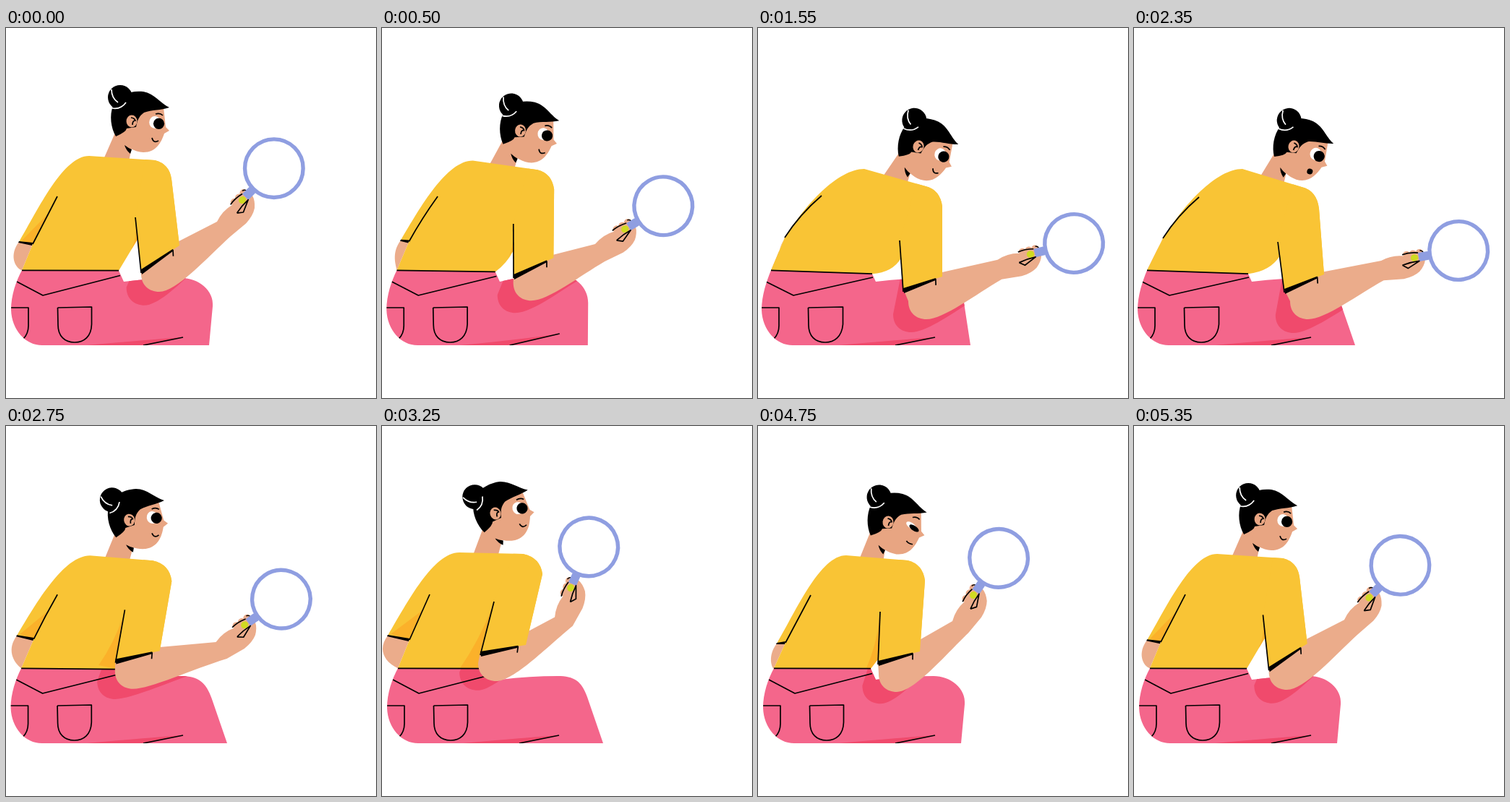
An HTML page with a canvas for the animation above (5.4 s loop, 512x512 px).

```html
<!DOCTYPE html>
<html lang="en">
<head>
<meta charset="utf-8">
<title>Woman with a magnifying glass</title>
<style>
html, body { margin: 0; width: 100%; height: 100%; overflow: hidden; background: #fff; }
canvas { display: block; width: 100vw; height: 100vh; object-fit: contain; }
</style>
</head>
<body>
<canvas id="stage" width="512" height="512"></canvas>
<script>
const ctx = document.getElementById('stage').getContext('2d');
const LOOP = 5400, STEP = 50;
const C = {
  shirt: '#f9c435', fold: '#fbb12a', pants: '#f4668b', shade: '#f04a6c',
  face: '#e8a582', arm: '#ebac8b', lens: '#8f9ee1', nail: '#d0da22', ink: '#000', white: '#fff'
};

// top/right/side: shoulders; cuff, inner: sleeve hem; pit: armpit; back: far sleeve; head, hand: x, y, degrees
const upright = {
  top: [115, 177], right: [206, 183], side: [229, 209], cuff: [240, 301], inner: [187, 335],
  pit: [179, 262], hem: [.41], elbow: [212, 340], fold: [173, 307],
  backTop: [71, 233], backEnd: [37, 299], backCuff: [18, 296],
  head: [174, 129, 0], hand: [327, 238, -45], knee: [281, 286, 385, 346], lean: [0]
};
const stoop = {
  top: [143, 194], right: [230, 218], side: [253, 247], cuff: [233, 346], inner: [174, 353],
  pit: [186, 285], hem: [.7], elbow: [198, 372], fold: [178, 333],
  backTop: [87, 233], backEnd: [38, 290], backCuff: [39, 290],
  head: [220, 163, 15], hand: [345, 320, -17], knee: [291, 284, 373, 333], lean: [1]
};
const reach = {
  ...stoop, top: [147, 195], right: [232, 219], side: [255, 247], cuff: [255, 344], inner: [201, 361],
  pit: [196, 294], hem: [.37], elbow: [233, 378], fold: [198, 319],
  backTop: [88, 232], backEnd: [37, 290], backCuff: [38, 290],
  head: [222, 164, 17], hand: [377, 313, -14], knee: [294, 285, 380, 346]
};
const look = {
  ...reach, top: [150, 195], right: [232, 220], side: [256, 250], cuff: [263, 341], inner: [208, 362],
  pit: [199, 296], hem: [.3], elbow: [241, 378], fold: [202, 316],
  backTop: [90, 234], backEnd: [40, 291], backCuff: [41, 291],
  head: [221, 164, 16], hand: [388, 318, -9.3], knee: [306, 287, 384, 346]
};
const raise = {
  top: [107, 175], right: [195, 177], side: [222, 205], cuff: [199, 303], inner: [136, 313],
  pit: [155, 243], hem: [1], elbow: [158, 328], fold: [108, 335],
  backTop: [66, 233], backEnd: [38, 296], backCuff: [8, 290],
  head: [157, 121, -16], hand: [261, 224, -66], knee: [306, 284, 375, 346], lean: [0]
};
const study = {
  ...upright, top: [122, 179], right: [207, 186], side: [231, 214], cuff: [224, 312], inner: [166, 326],
  pit: [169, 257], hem: [.95], elbow: [192, 343], fold: [150, 335],
  backTop: [73, 234], backEnd: [38, 300], backCuff: [26, 301],
  head: [180, 133, 6], hand: [298, 234, -55.5]
};

const lerp = (a, b, k) => a + (b - a) * k;
const mid = (p, q, k) => [lerp(p[0], q[0], k), lerp(p[1], q[1], k)];
const add = (p, x, y) => [p[0] + x, p[1] + y];

function mix(a, b, k, handK = k) {
  const out = {};
  for (const f in a) out[f] = a[f].map((v, i) => lerp(v, b[f][i], f === 'hand' ? handK : k));
  return out;
}

const keys = [
  [0, upright],
  [600, mix(upright, stoop, .5, .62)],
  [850, stoop],
  [1100, mix(stoop, reach, .12)],
  [1550, reach],
  [1950, { ...mix(reach, look, 1.4, 3), head: [227, 171, 19] }],
  [2350, look],
  [2800, mix(look, raise, .87, .52)],
  [3000, mix(look, raise, 1.09, .8)],
  [3250, raise],
  [3850, mix(upright, study, .35, 0)],
  [4200, mix(upright, study, .4, .02)],
  [4750, study]
];

function keyAt(i) {
  const n = keys.length, turn = Math.floor(i / n), k = keys[i - turn * n];
  return [k[0] + turn * LOOP, k[1]];
}

// Monotone cubic through the poses
function poseAt(t) {
  let i = keys.length - 1;
  while (keys[i][0] > t) i--;
  const k = [keyAt(i - 1), keyAt(i), keyAt(i + 1), keyAt(i + 2)];
  const h = k[2][0] - k[1][0], s = (t - k[1][0]) / h;
  const slope = (a, b) => a * b <= 0 ? 0 : 2 * a * b / (a + b);
  const pose = {};
  for (const f in upright) {
    pose[f] = upright[f].map((_, j) => {
      const v = k.map(e => e[1][f][j]);
      const d = [0, 1, 2].map(n => (v[n + 1] - v[n]) / (k[n + 1][0] - k[n][0]));
      const m0 = slope(d[0], d[1]) * h, m1 = slope(d[1], d[2]) * h;
      const s2 = s * s, s3 = s2 * s;
      return v[1] * (2 * s3 - 3 * s2 + 1) + m0 * (s3 - 2 * s2 + s) + v[2] * (3 * s2 - 2 * s3) + m1 * (s3 - s2);
    });
  }
  return pose;
}

// Each step holds one, two or three points: line, quadratic or cubic
function trace(start, ...steps) {
  const p = new Path2D();
  p.moveTo(...start);
  for (const s of steps) {
    if (s.length === 2) p.lineTo(...s);
    else if (s.length === 4) p.quadraticCurveTo(...s);
    else p.bezierCurveTo(...s);
  }
  return p;
}
function fill(path, color) { ctx.fillStyle = color; ctx.fill(path); }
function line(path, width = 1.7, color = C.ink) {
  ctx.strokeStyle = color; ctx.lineWidth = width; ctx.stroke(path);
}
function oval(x, y, rx, ry, color) {
  const p = new Path2D();
  p.ellipse(x, y, rx, ry, 0, 0, 7);
  fill(p, color);
}
function placed([x, y, deg], draw) {
  ctx.save();
  ctx.translate(x, y);
  ctx.rotate(deg * Math.PI / 180);
  draw();
  ctx.restore();
}
function toStage([x, y, deg], u, v) {
  const a = deg * Math.PI / 180, c = Math.cos(a), s = Math.sin(a);
  return [x + u * c - v * s, y + u * s + v * c];
}

function drawNeck(p) {
  const l = p.lean[0], at = (u, v) => toStage(p.head, u, v);
  const c = mid(p.top, p.right, .6 + .09 * l), d = mid(p.top, p.right, .24 + .07 * l);
  fill(trace(at(-23, 16), at(-10, 0), at(8, 0), at(8, 25), at(0, 36), add(c, 0, 6), add(d, -4, 8)), C.face);
}

function drawBun(tilt) {
  const back = Math.min(0, tilt);
  placed([0, 0, back * .6], () => placed([-16, -33, back * 1.2], () => {
    oval(0, 0, 17, 17, C.ink);
    line(trace([-12, -11], [-12, 1, -3, 7]), 1.7, C.white);
    line(trace([-11, 15], [1, 17, 8, 7]), 1.7, C.white);
  }));
}

function drawHead(p, open, round) {
  placed(p.head, () => {
    fill(trace([-8, 10], [8, -18], [44, -19], [47, 8], [52, 13], [45, 17],
      [41, 29, 34, 43, 16, 43], [3, 42, -6, 36, -10, 31]), C.face);
    fill(trace([-10, 33], [-5, 37, 0, 39], [-2, 45], [-8, 40, -10, 33]), C.ink);
    fill(trace([-22, 21], [-29, 9, -31, -8, -26, -21], [-19, -37, -1, -43, 16, -41],
      [32, -38, 38, -26, 52, -19], [40, -15, 28, -16, 17, -12], [10, -7, 8, -2, 6, 8],
      [-7, 10], [-8, 15, -22, 21]), C.ink);
    drawBun(p.head[2]);
    oval(0, 0, 7.5, 8.5, C.face);
    line(trace([-1, -5], [5, -4, 5, 0]), 1.7);
    line(trace([5, -1], [1, -1, 1, 5]), 1.7);

    ctx.save();
    ctx.translate(33, 2);
    ctx.rotate(.9 * (1 - open));
    ctx.scale(1, open);
    oval(-1, -.5, 7.8, 8.5, C.white);
    oval(4.5, 1.3, 7.6, 7.6, C.ink);
    ctx.restore();
    line(trace([33, -10], [39, -12, 43, -8]), 1.7);
    if (round > 0) oval(31, 27, 4 * round, 4 * round, C.ink);
    else line(trace([28, 23], [30, 22.5 + 8.5 * open, 37, 27]), 1.7);
  });
}

function drawBackArm(p, waist) {
  const [x, y] = p.backCuff;
  fill(trace(p.backCuff, [x - 14, y + 18, x - 6, y + 36, ...waist], p.backEnd), C.arm);
}

function drawShirt(p, waistL, waistR, seam) {
  const l = p.lean[0], [x, y] = p.backCuff, m = mid(seam, waistR, .5);
  const body = trace(p.top, p.right, [p.side[0] - 3, p.right[1] + 5, ...p.side], p.cuff, p.inner, seam,
    [m[0] + 8 * l, m[1] + 9 * l, ...waistR], waistL, p.backEnd, p.backCuff,
    [x + 27, y - 46, p.top[0] - 36, p.top[1], ...p.top]);
  fill(body, C.shirt);
  const f = mid(p.pit, p.inner, .1), g = mid(f, p.fold, .55);
  fill(trace(f, seam, mid(seam, waistR, p.hem[0] > .8 ? 1 : .3), p.fold, [g[0] + 5, g[1] + 2, ...f]), C.fold);

  const b = mid(p.backTop, p.backEnd, .35);
  ctx.save();
  ctx.clip(body);
  fill(trace(b, p.backEnd, add(p.backCuff, 4, -2)), l < .3 && p.backEnd[0] - x > 14 ? C.fold : C.shirt);
  ctx.restore();
  if (l < .9) fill(trace(add(p.backCuff, 0, -1), add(p.backEnd, 0, -2), add(p.backEnd, -1, 2), add(p.backCuff, -1, 1)), C.ink);
  const c = mid(p.backTop, p.backEnd, .5);
  line(trace(p.backTop, [c[0] - 5 * l, c[1] - 3 * l, ...p.backEnd]));
}

function pantsPath(p, waistL, waistR) {
  const [hem, kx, ky, top] = p.knee, s = -2 * p.lean[0];
  const dx = (kx - hem) / (438 - ky) * 22;
  return trace(waistL, [14 + s, 350, 7 + s, 370, 7 + s, 390], [8 + s, 418, 27 + s, 439, 50 + s, 439],
    [hem, 439], [kx, ky], [kx + dx, ky - 22, 266, top, 243, top], [205, top, 163, 351], waistR);
}

function drawPants(p, waistL, waistR) {
  const l = p.lean[0], s = -2 * l, up = (346 - p.knee[3]) / 13;
  const path = pantsPath(p, waistL, waistR);
  const a = [190 - 35 * up, 439], b = [245 + 2 * up, 428 - 13 * up];
  const swing = p.inner[0] - p.pit[0];
  fill(path, C.pants);
  ctx.save();
  ctx.clip(path);
  fill(trace([112 - 10 * up, 439], [200 - 20 * up, 431, ...b], a), C.shade);
  placed([-22 + .2 * swing, 17 + .22 * swing, 0], () => fill(armPath(p, add(p.inner, 17, -33)), C.shade));
  line(trace(a, b));
  line(trace([15 - 4 * l, 351], [51 + s, 370], [158 + l, 342.5 + 2.5 * l]));
  line(trace([71.5 + s, 387], [118.5 + s / 2, 386], [118.5 + s / 2, 410],
    [118 + s, 427, 108 + s, 435, 95 + s, 435], [81 + s, 435, 72 + s, 426, 72 + s, 411], [71.5 + s, 387]));
  line(trace([0, 387], [31 + s, 387], [31 + s, 412], [31 + s, 423, 24 + s, 430]));
  ctx.restore();
  line(trace(waistL, waistR));
}

function armPath(p, from) {
  const [x, y] = p.elbow, at = (u, v) => toStage(p.hand, u, v);
  const wrist = at(-47, 24), c = mid(wrist, [x + 25, y + 15], .45);
  return trace(from, [x - 25, y], [x - 25, y + 16, x - 14, y + 25, x, y + 25],
    [x + 24, y + 25, ...c, ...wrist], at(-19, 26.5), [...at(-5, 26), ...at(4, 20)],
    [...at(12, 13), ...at(14, 6)], at(13, -4), at(-15, -5), [...at(-30, -9), ...at(-46, -3.5)],
    mid(mid(p.cuff, p.inner, .35), p.pit, .12));
}

function drawSleeve(p) {
  const a = p.inner, b = mid(a, p.cuff, .83);
  fill(trace(p.pit, mid(p.top, p.right, .85), p.right, [p.side[0] - 3, p.right[1] + 5, ...p.side], p.cuff, a), C.shirt);
  fill(trace(add(a, 0, -1), add(b, 0, -1), add(b, 0, 2), add(a, 1, 6)), C.ink);
  line(trace(p.pit, add(a, 0, 4)));
  line(trace(b, add(b, (a[0] - p.pit[0]) * .06, 9)));
}

function drawHand(p) {
  placed(p.hand, () => {
    for (const u of [-10, -1, 8]) oval(u, -6.5, 5, 4.3, C.arm);
    line(trace([-16, -7], [-6, -9, 6, -6]));
    line(trace([9, -9], [13, -8, 13, -5]), 1.5);
    fill(trace([6, -6], [19, -6], [23, -4], [23, 4], [19, 6], [6, 6]), C.lens);
    const ring = new Path2D();
    ring.arc(62, 0, 40.3, 0, 7);
    line(ring, 5.4, C.lens);
    oval(0, 0, 5.2, 4.8, C.nail);
    line(trace([-18, 7.5], [-6, 5, 6, 5.5], [-11, 13], [-18, 7.5]));
  });
}

function draw(t) {
  const p = poseAt(t), l = p.lean[0];
  const waistL = [22 - 4 * l, 335.3], waistR = [156 + 2 * l, 335.7 + 4.5 * l];
  const seam = mid(p.pit, p.inner, p.hem[0]);
  const open = 1 - .55 * Math.max(0, 1 - Math.abs(t - 4750) / 150);
  const round = Math.max(0, Math.min(1, (t - 1950) / 100, (2750 - t) / 100));

  ctx.fillStyle = C.white;
  ctx.fillRect(0, 0, 512, 512);
  ctx.lineJoin = 'round';
  drawNeck(p);
  drawHead(p, open, round);
  drawBackArm(p, waistL);
  drawShirt(p, waistL, waistR, seam);
  drawPants(p, waistL, waistR);
  fill(armPath(p, p.inner), C.arm);
  drawSleeve(p);
  drawHand(p);
}

const start = performance.now();
function tick() {
  const t = (performance.now() - start) % LOOP;
  draw(Math.floor(t / STEP) * STEP);
  requestAnimationFrame(tick);
}
tick();
</script>
</body>
</html>
```
